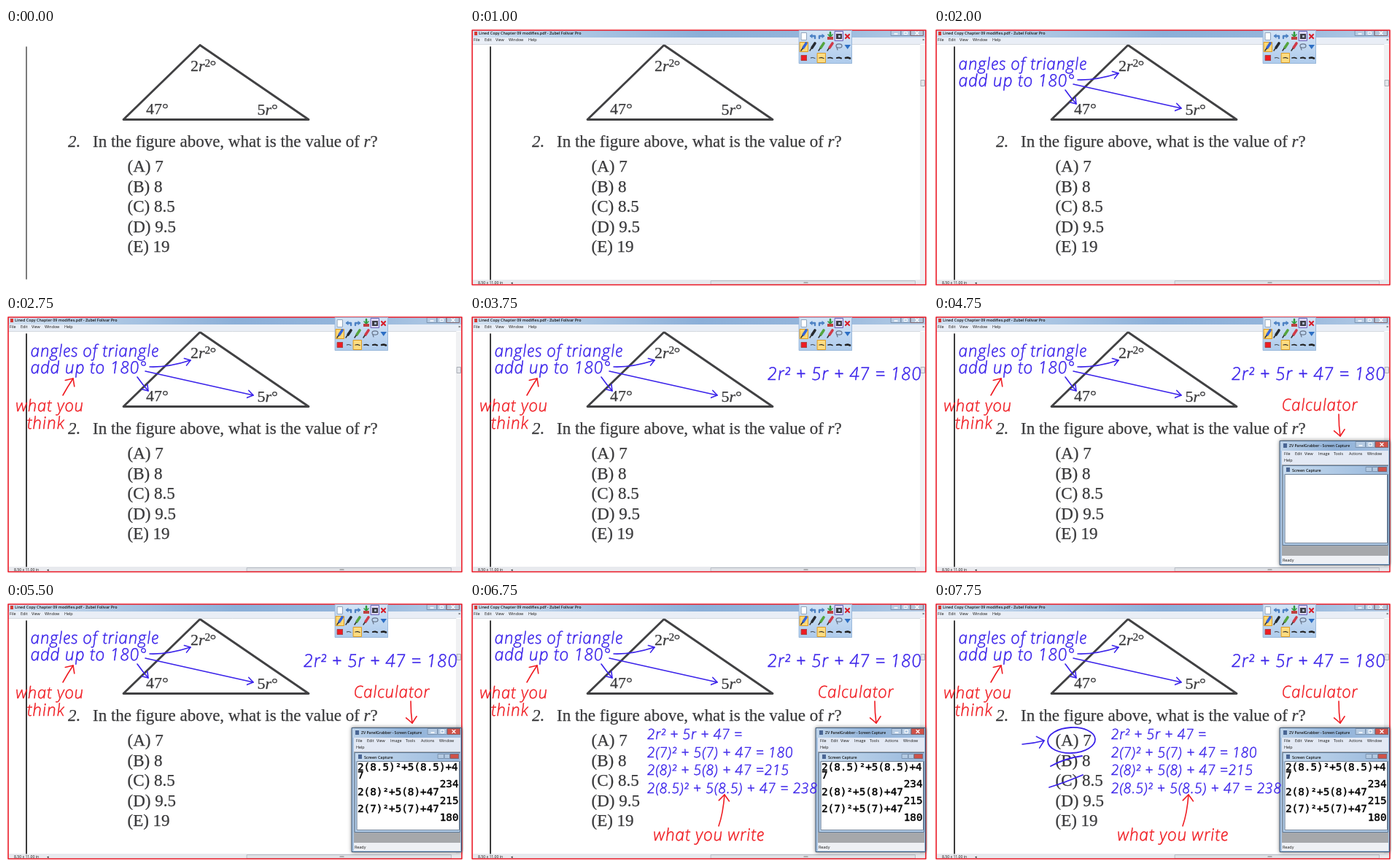
Write an HTML page with a canvas that moves like this. It is 628 px wide and 355 px high and loops after 8.75 s.

```html
<!DOCTYPE html>
<html lang="en">
<head>
<meta charset="utf-8">
<title>Triangle problem</title>
<style>
  html, body { margin: 0; width: 100%; height: 100%; overflow: hidden; background: #fff; }
  canvas { display: block; width: 628px; height: 355px; }
</style>
</head>
<body>
<canvas id="stage"></canvas>
<script>
const W = 628, H = 355, LOOP = 8750;
const canvas = document.getElementById('stage');
const ctx = canvas.getContext('2d');
const scale = window.devicePixelRatio || 1;
canvas.width = W * scale;
canvas.height = H * scale;

const INK = '#39393b', BLUE = '#3a22ea', RED = '#f01c22';
const SERIF = '"Liberation Serif", "Times New Roman", serif';
const UI = '"Open Sans", "Noto Sans", sans-serif';
const MONO = '"DejaVu Sans Mono", monospace';

// The optional outline thickens the letters.
function text(str, x, y, font, color, outline = 0, align = 'left') {
  ctx.font = font;
  ctx.textAlign = align;
  ctx.fillStyle = ctx.strokeStyle = color;
  ctx.fillText(str, x, y);
  if (outline) {
    ctx.lineWidth = outline;
    ctx.strokeText(str, x, y);
  }
}

const serif = (str, x, y, size = 23, style = '') =>
  text(str, x, y, `${style} ${size}px ${SERIF}`, INK, 0.25);
const ui = (str, x, y, size = 5.4, weight = 400) =>
  text(str, x, y, `${weight} ${size}px ${UI}`, '#151515');

// Light italics, partly straightened, pass for handwriting.
function hand(str, x, y, size, color) {
  ctx.save();
  ctx.transform(1, 0, 0.08, 1, x, y);
  ctx.letterSpacing = `${size * 0.03}px`;
  text(str, 0, 0, `italic 300 ${size}px ${UI}`, color, 0.45);
  ctx.restore();
}

function box(x, y, w, h, fill, stroke) {
  if (fill) {
    ctx.fillStyle = fill;
    ctx.fillRect(x, y, w, h);
  }
  if (stroke) {
    ctx.strokeStyle = stroke;
    ctx.lineWidth = 1;
    ctx.strokeRect(x + 0.5, y + 0.5, w - 1, h - 1);
  }
}

function line(points, color, width) {
  ctx.beginPath();
  points.forEach(([x, y]) => ctx.lineTo(x, y));
  ctx.strokeStyle = color;
  ctx.lineWidth = width;
  ctx.stroke();
}

function curve([a, b, c], color, width) {
  ctx.beginPath();
  ctx.moveTo(...a);
  ctx.quadraticCurveTo(...b, ...c);
  ctx.strokeStyle = color;
  ctx.lineWidth = width;
  ctx.stroke();
}

function arrow(points, color, head = 9, spread = 0.6) {
  curve(points, color, 1.6);
  const [, [px, py], [x, y]] = points;
  const a = Math.atan2(y - py, x - px);
  const barb = s => [x - head * Math.cos(a + s), y - head * Math.sin(a + s)];
  line([barb(spread), [x, y], barb(-spread)], color, 1.6);
}

function shade(x0, y0, x1, y1, ...colors) {
  const g = ctx.createLinearGradient(x0, y0, x1, y1);
  colors.forEach((c, i) => g.addColorStop(i / (colors.length - 1), c));
  return g;
}

function windowButtons(x, y, h, closeColor) {
  box(x, y, 14, h, '#b4cae2', '#7b93b0');
  box(x + 14, y, 13, h, '#b4cae2', '#7b93b0');
  box(x + 27, y, 18, h, closeColor, '#7f6570');
  line([[x + 5, y + h - 3], [x + 9, y + h - 3]], '#fff', 1.4);
  box(x + 18, y + 2, 5, h - 4, null, '#fff');
  const cx = x + 36, cy = y + h / 2;
  line([[cx - 2, cy - 2], [cx + 2, cy + 2]], '#fff', 1.2);
  line([[cx - 2, cy + 2], [cx + 2, cy - 2]], '#fff', 1.2);
}

function problem() {
  line([[28, 26], [28, 344]], '#444', 1.4);
  line([[266, 23.5], [415, 125.5], [161, 125.5], [266, 23.5]], '#414143', 2.9);

  serif('2', 253, 59, 22);
  serif('r', 264, 59, 22, 'italic');
  serif('2', 272.5, 53, 15.5);
  serif('°', 279.5, 59, 22);
  serif('47°', 192, 118, 22);
  serif('5', 344.5, 119, 22);
  serif('r', 355.5, 119, 22, 'italic');
  serif('°', 364, 119, 22);

  serif('2.', 85, 163, 23, 'italic');
  serif('In the figure above, what is the value of ', 119, 163);
  serif('r', 490.5, 163, 23, 'italic');
  serif('?', 499.5, 163);
  ['(A) 7', '(B) 8', '(C) 8.5', '(D) 9.5', '(E) 19']
    .forEach((s, i) => serif(s, 166.5, 197 + i * 27.5));
}

function pen(x, y, color) {
  line([[x + 3, y - 5], [x - 1, y + 1]], color, 3.6);
  line([[x - 2, y + 2], [x - 4, y + 5]], '#333', 1.5);
}

function toolbar() {
  box(451, 3, 73, 46, shade(0, 3, 0, 49, '#d3e4f6', '#aecbec'), '#9ab8da');
  box(500, 4, 12, 14, '#dcd8f4', '#6a62b8');
  box(452, 19, 12, 14, '#ffd873', '#d89a28');
  box(476, 34, 12, 14, '#ffdc80', '#d89a28');

  box(454, 6, 8, 11, '#fff', '#8fa4bd');
  for (const [x, s] of [[470, 1], [482, -1]]) {
    line([[x + 3 * s, 14], [x + 3 * s, 11], [x - 3 * s, 11]], '#4d82c4', 2.4);
    line([[x - s, 9], [x - 3 * s, 11], [x - s, 13]], '#4d82c4', 1.5);
  }
  line([[494, 6], [494, 11]], '#2f9a3c', 2.5);
  line([[491, 9], [494, 12], [497, 9]], '#2f9a3c', 1.6);
  box(490, 12, 8, 4, '#c04040');
  box(502, 8, 8, 7, '#3c3c46');
  box(505, 10, 3, 3, '#a8b4c8');
  line([[515, 9], [520, 14]], '#d8202c', 2.2);
  line([[515, 14], [520, 9]], '#d8202c', 2.2);

  ['#3564d8', '#262a30', '#55a53e', '#d03a48'].forEach((c, i) => pen(458 + i * 12, 26, c));
  ctx.beginPath();
  ctx.ellipse(506, 24.5, 4, 2.7, 0, 0, 7);
  ctx.strokeStyle = '#66748a';
  ctx.lineWidth = 1.2;
  ctx.stroke();
  line([[503, 27], [504, 30]], '#66748a', 1.2);
  ctx.beginPath();
  ctx.moveTo(513.5, 23);
  ctx.lineTo(522, 23);
  ctx.lineTo(517.7, 29);
  ctx.fillStyle = '#2d6fc4';
  ctx.fill();

  box(454, 37, 8, 8, '#ee1c24', '#a44');
  for (let i = 0; i < 5; i++) {
    const x = 470 + i * 12;
    line([[x - 3, 41], [x, 40.5], [x + 3, 41.5]], '#222', 0.8 + i * 0.45);
  }
}

function viewer() {
  box(3, 3, 622, 10, shade(3, 0, 625, 0, '#d2e1f1', '#aac5e3', '#8bafd8', '#94b5db', '#b4cce6'));
  box(3, 13, 622, 9, '#e9eef6');
  line([[3, 22.5], [617, 22.5]], '#c9ced6', 0.8);
  box(6, 5, 4, 5, '#d43a34');
  ui('Lined Copy Chapter 09 modifies.pdf - Zubel Folivar Pro', 12, 9.4, 5.4, 600);
  windowButtons(577, 3, 8, '#b4c6da');
  [['File', 5], ['Edit', 20], ['View', 35], ['Window', 53], ['Help', 80]]
    .forEach(([s, x]) => ui(s, x, 18.3));
  ui('×', 620, 18, 6);

  box(617, 23, 7, 322, '#f0f1f3');
  box(618, 71, 6, 9, '#e4e6ea', '#a8adb5');
  box(4, 345, 620, 7, '#e8eaee');
  ui('8.50 x 11.00 in', 11, 350.8, 5.1);
  ui('◂', 56, 350.5, 5);
  box(330, 346, 281, 6, '#dfe2e6', '#b9bec6');
  line([[458, 349], [463, 349]], '#777', 1.2);
  line([[28, 26], [28, 345]], '#222', 1.4);
  ctx.strokeStyle = '#ec1c28';
  ctx.lineWidth = 1.6;
  ctx.strokeRect(3, 3, 622, 349);
  toolbar();
}

function angleNote() {
  hand('angles of triangle', 34, 56.5, 22.6, BLUE);
  hand('add up to 180°', 34, 79.5, 23.2, BLUE);
  arrow([[197, 71], [222, 72], [253, 62]], BLUE);
  arrow([[191, 77], [262, 93], [339, 110]], BLUE);
  arrow([[180, 85], [187, 95], [195, 104]], BLUE);
}

function thinkNote() {
  hand('what you', 14, 131.5, 22.5, RED);
  hand('think', 29, 156, 23, RED);
  arrow([[78, 110], [84, 99], [92, 87]], RED, 11, 0.75);
}

function equation() {
  hand('2r² + 5r + 47 = 180', 408, 89, 24.4, BLUE);
}

function calculator() {
  hand('Calculator', 477, 130.5, 22.5, RED);
  arrow([[555, 136], [555, 152], [557, 166]], RED, 11, 0.72);

  ctx.save();
  ctx.shadowColor = 'rgba(0, 0, 0, 0.55)';
  ctx.shadowBlur = 5 * scale;
  box(474, 172, 151, 171, '#a9c5e4');
  ctx.restore();
  box(474, 172, 151, 171, null, '#3f5874');
  box(475, 173, 149, 13, shade(475, 0, 624, 0, '#bdd3ea', '#8fb1d8', '#a5c1e1'));
  box(479, 176, 5, 6, '#4a6694');
  ui('ZV PanelGrabber - Screen Capture', 487, 181.3, 5.1, 600);
  windowButtons(578, 173, 9, '#cf5148');
  box(477, 186, 146, 19, '#e3e9f4');
  [['File', 480], ['Edit', 495], ['View', 508], ['Image', 527], ['Tools', 548], ['Actions', 569], ['Window', 594]]
    .forEach(([s, x]) => ui(s, x, 192.2));
  ui('Help', 480, 200.5);

  box(477, 205, 146, 125, '#a6a8ab');
  box(478, 206, 145, 110, '#b4cee9', '#5d7896');
  box(479, 207, 144, 11, shade(479, 0, 623, 0, '#c6daee', '#98b8dc'));
  box(483, 209, 5, 6, '#4a6694');
  ui('Screen Capture', 491, 214.8, 5.4, 600);
  box(592, 208, 9, 7, '#b4cae2', '#7b93b0');
  box(601, 208, 8, 7, '#b4cae2', '#7b93b0');
  box(609, 208, 12, 7, '#cf5148', '#7f6570');
  box(481, 218, 141, 95, '#fff', '#6f8298');
  box(477, 330, 146, 11, '#eef0f4');
  ui('Ready', 478, 338);
}

function results() {
  const font = `14.3px ${MONO}`;
  const rows = ['2(8.5)²+5(8.5)+4', '7', '>234', '2(8)²+5(8)+47', '>215', '2(7)²+5(7)+47', '>180'];
  rows.forEach((row, i) => {
    const y = 230.5 + i * 11.5;
    if (row[0] === '>') text(row.slice(1), 620.5, y, font, '#000', 0.45, 'right');
    else text(row, 482, y, font, '#000', 0.45);
  });
}

function work() {
  ['2r² + 5r + 47 =', '2(7)² + 5(7) + 47 = 180', '2(8)² + 5(8) + 47 =215', '2(8.5)² + 5(8.5) + 47 = 238']
    .forEach((s, i) => hand(s, 243, 188 + i * 24.5, 19.7, BLUE));
  hand('what you write', 252, 326.5, 23, RED);
  arrow([[341, 307], [347, 290], [349, 264]], RED, 11, 0.7);
}

function answer() {
  arrow([[121, 195], [136, 194], [151, 190]], BLUE, 12, 0.75);
  ctx.beginPath();
  ctx.ellipse(188.5, 189.5, 32.5, 17.5, -0.05, 0, 7);
  ctx.strokeStyle = BLUE;
  ctx.lineWidth = 1.8;
  ctx.stroke();
  curve([[160, 225], [180, 214], [203, 211]], BLUE, 1.8);
  curve([[158, 254], [178, 248], [204, 237]], BLUE, 1.8);
}

const steps = [
  [0, problem], [1000, viewer], [2000, angleNote], [2750, thinkNote], [3750, equation],
  [4750, calculator], [5500, results], [6750, work], [7750, answer]
];

const start = performance.now();

function draw(now) {
  const t = Math.max(0, now - start) % LOOP;
  ctx.setTransform(scale, 0, 0, scale, 0, 0);
  ctx.lineCap = ctx.lineJoin = 'round';
  box(0, 0, W, H, '#fff');
  for (const [at, paint] of steps) if (t >= at) paint();
  requestAnimationFrame(draw);
}
draw(start);
</script>
</body>
</html>
```
